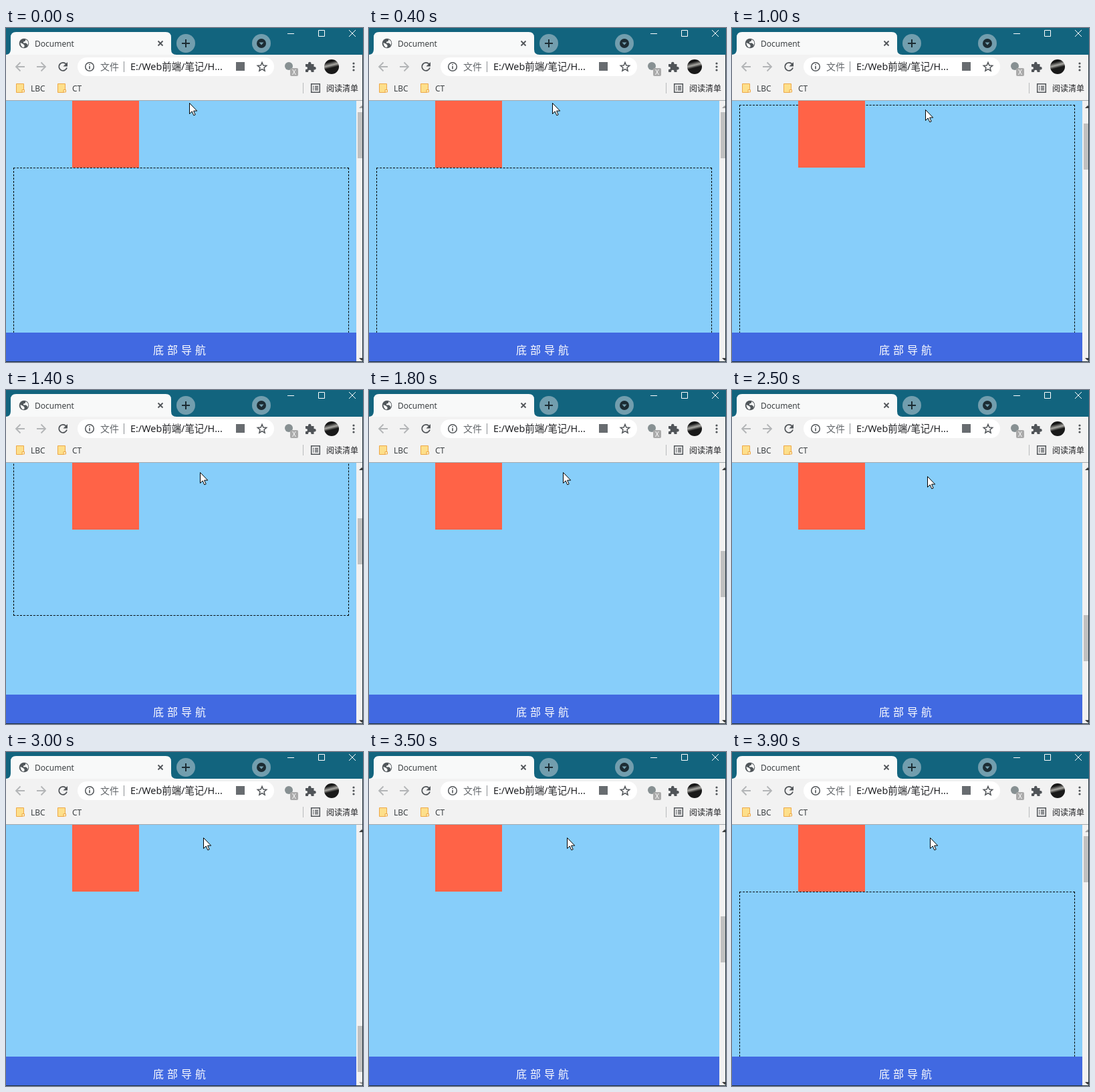
Write an HTML page that moves like this. It is 534 px wide and 500 px high and loops after 4000 ms.

```html
<!DOCTYPE html>
<html lang="zh">
<head>
<meta charset="utf-8">
<title>Document</title>
<style>
  html, body { margin: 0; width: 100%; height: 100%; overflow: hidden; }
  body { position: relative; background: #f1f1f1; }
  svg { position: absolute; left: 0; top: 0; display: block; }
  text { font-family: "Noto Sans", "Noto Sans CJK SC", "Noto Sans CJK", sans-serif; font-size: 12px; fill: #3c4043; }
  #page { position: absolute; left: 0; top: 109px; width: 524px; height: 390px; overflow: hidden; background: #87cefa; }
  #box { position: absolute; left: 11px; top: 100px; width: 500px; height: 500px; border: 1px dashed #000; }
  #fixed { position: absolute; left: 99px; top: 0; width: 100px; height: 100px; background: #ff6347; }
  #nav {
    position: absolute; left: 0; top: 347px; width: 524px; height: 50px;
    background: #4169e1; color: #fff; text-align: center;
    font: 16px/50px "Noto Sans CJK SC", "Noto Sans CJK", sans-serif; letter-spacing: 5px;
  }
  .line { fill: none; stroke: #505458; stroke-width: 1.8; }
  .off { stroke: #b3b5b7; }
  .thin { fill: none; stroke: #fff; stroke-width: 1; }
</style>
</head>
<body>
<div id="page">
  <div id="box"></div>
  <div id="fixed"></div>
  <div id="nav">底部导航</div>
</div>

<svg width="534" height="500" viewBox="0 0 534 500">
  <defs>
    <linearGradient id="photo" x1="0" y1="0" x2=".25" y2="1">
      <stop offset=".25" stop-color="#151515"/>
      <stop offset=".48" stop-color="#aaa9a4"/>
      <stop offset=".66" stop-color="#191919"/>
    </linearGradient>
    <g id="note">
      <path d="M.5.5h11v9l-2 4h-9z" fill="#fddf8b" stroke="#eda849"/>
      <path d="M9 13V9.500h3.500V13z" fill="#fff0c2" stroke="#eda849"/>
    </g>
  </defs>

  <!-- title bar -->
  <path d="M0 0H534V40H0z" fill="#12647e"/>
  <path d="M-1 40Q7 40 7 32V14Q7 6 15 6H239Q247 6 247 14V32Q247 40 255 40z" fill="#f8f9f9"/>
  <circle cx="27" cy="23" r="7.300" fill="#50565a"/>
  <path d="M21.500 22l3.500 1.500 2.500 2v3l-2 .8q-4-2.300-4-7.300zM25 17.500h4v2l-3 1.200v1.800h4l2.500 2.500-1 2.500q3-4 1-8l-2.500-2z" fill="#f8f9f9"/>
  <text x="43" y="28">Document</text>
  <path class="line" d="M227.500 19.500l7 7m0-7l-7 7"/>
  <g fill="#729eae">
    <circle cx="269" cy="23" r="14"/>
    <circle cx="382" cy="23" r="14"/>
  </g>
  <path d="M263 23h12M269 17v12" stroke="#1c2c33" stroke-width="2"/>
  <circle cx="382" cy="23" r="7" fill="#1c2c33"/>
  <path d="M378.500 21.500h7l-3.500 4z" fill="#729eae"/>
  <path class="thin" d="M421 8.500h10M467.500 3.500h9v9h-9zM513 3l10 10m0-10l-10 10"/>

  <!-- toolbar -->
  <path d="M0 40H534V108H0z" fill="#f2f2f2"/>
  <path d="M0 108.500H534" stroke="#a4a9ac"/>
  <path class="line off" d="M28 58H15m6.500-6.500L15 58l6.500 6.500M46 58h13m-6.500-6.500L59 58l-6.500 6.500"/>
  <path class="line" d="M89.800 54A6 6 0 1 0 91 59.500"/>
  <path d="M92 51v6.500h-6.500z" fill="#505458"/>
  <rect x="107" y="44" width="294" height="28" rx="14" fill="#fff"/>
  <circle class="line" cx="125" cy="58" r="6.300" style="stroke-width:1.500"/>
  <path d="M125 57v4.500M125 54v1.500" stroke="#505458" stroke-width="1.600"/>
  <text x="141" y="63" style="font-size:14px;fill:#63676b">文件</text>
  <path d="M176.500 50v16" stroke="#8d9194"/>
  <text x="186" y="63" style="font-size:14.400px;fill:#202124">E:/Web前端/笔记/H...</text>
  <rect x="344" y="51" width="13" height="13" fill="#686c70"/>
  <path id="star" class="line" style="stroke-width:1.500"/>
  <circle cx="423" cy="57" r="6" fill="#879092"/>
  <rect x="425" y="60" width="12" height="12" rx="2" fill="#aaa"/>
  <text x="431" y="70" text-anchor="middle" style="font-size:10px;fill:#fff">X</text>
  <path d="M448 54h4v-1a2 2 0 0 1 4.500 0v1h4v4h1a2 2 0 0 1 0 4.500h-1V66h-4v-1a2 2 0 0 0-4.500 0v1h-4v-4h1a2 2 0 0 0 0-4h-1z" fill="#505458"/>
  <circle cx="487" cy="58" r="11" fill="url(#photo)"/>
  <g fill="#505458">
    <circle cx="520" cy="53" r="1.600"/>
    <circle cx="520" cy="58" r="1.600"/>
    <circle cx="520" cy="63" r="1.600"/>
  </g>

  <!-- bookmarks -->
  <use href="#note" x="15" y="83"/>
  <text x="37" y="95">LBC</text>
  <use href="#note" x="77" y="83"/>
  <text x="99" y="95">CT</text>
  <path d="M444.500 82v16" stroke="#b8babc"/>
  <path class="line" style="stroke-width:1.500" d="M456.700 83.700h12.600v12.600h-12.600zM459 87.500h1.500m1.500 0h5M459 90h1.500m1.500 0h5M459 92.500h1.500m1.500 0h5"/>
  <text x="479" y="95" style="fill:#202124">阅读清单</text>

  <!-- scrollbar and window edge -->
  <path d="M524 109h10v390h-10z" fill="#f1f1f1"/>
  <path id="up" d="M528 120l4-4 4 4z"/>
  <path id="down" d="M528 494l4 4 4-4z"/>
  <rect id="thumb" x="526" width="7" height="69" fill="#c1c1c1"/>
  <path d="M533.500 40V500M0 499.500H534" stroke="#22333c"/>

  <path id="cursor" d="M.5.5V16.500l3.700-3.600 2.600 5.900 2.400-1-2.600-5.700h5.100z" fill="#fff" stroke="#000"/>
</svg>

<script>
  const $ = id => document.getElementById(id);
  const LOOP = 4000, STEP = 100, MAX = 1609;

  // [time, value...] keys joined by straight segments
  const scrollKeys = [[0, 0], [800, 0], [900, 30], [1000, 94], [1800, 652], [1900, 652],
    [2500, 1195], [3000, MAX], [3100, MAX], [3500, 680], [3900, 0]];
  const cursorKeys = [[0, 275, 113], [500, 275, 113], [800, 290, 123], [1000, 290, 123],
    [1800, 291, 124], [2500, 293, 130], [3300, 297, 129]];

  function at(keys, t) {
    const i = keys.findIndex(k => k[0] > t);
    if (i < 0) return keys[keys.length - 1].slice(1);
    const a = keys[i - 1], b = keys[i], p = (t - a[0]) / (b[0] - a[0]);
    return a.slice(1).map((v, n) => v + (b[n + 1] - v) * p);
  }

  function star(cx, cy, r) {
    const points = Array.from({ length: 10 }, (_, i) => {
      const a = i * Math.PI / 5 - Math.PI / 2, d = i % 2 ? r * 0.45 : r;
      return (cx + d * Math.cos(a)).toFixed(1) + ' ' + (cy + d * Math.sin(a)).toFixed(1);
    });
    return 'M' + points.join('L') + 'z';
  }
  $('star').setAttribute('d', star(383, 58.5, 7));

  const arrowFill = on => on ? '#404040' : '#a3a3a3';

  function draw(now) {
    const t = Math.floor(now % LOOP / STEP) * STEP;
    const [y] = at(scrollKeys, t);
    const [cx, cy] = at(cursorKeys, t).map(Math.round);
    $('box').style.transform = `translateY(${-Math.round(y)}px)`;
    $('thumb').setAttribute('y', Math.round(126 + y * 0.1765));
    $('up').setAttribute('fill', arrowFill(y > 0));
    $('down').setAttribute('fill', arrowFill(y < MAX));
    $('cursor').setAttribute('transform', `translate(${cx - 1} ${cy - 1})`);
  }

  const start = performance.now();
  function tick() {
    draw(performance.now() - start);
    requestAnimationFrame(tick);
  }
  tick();
</script>
</body>
</html>
```
